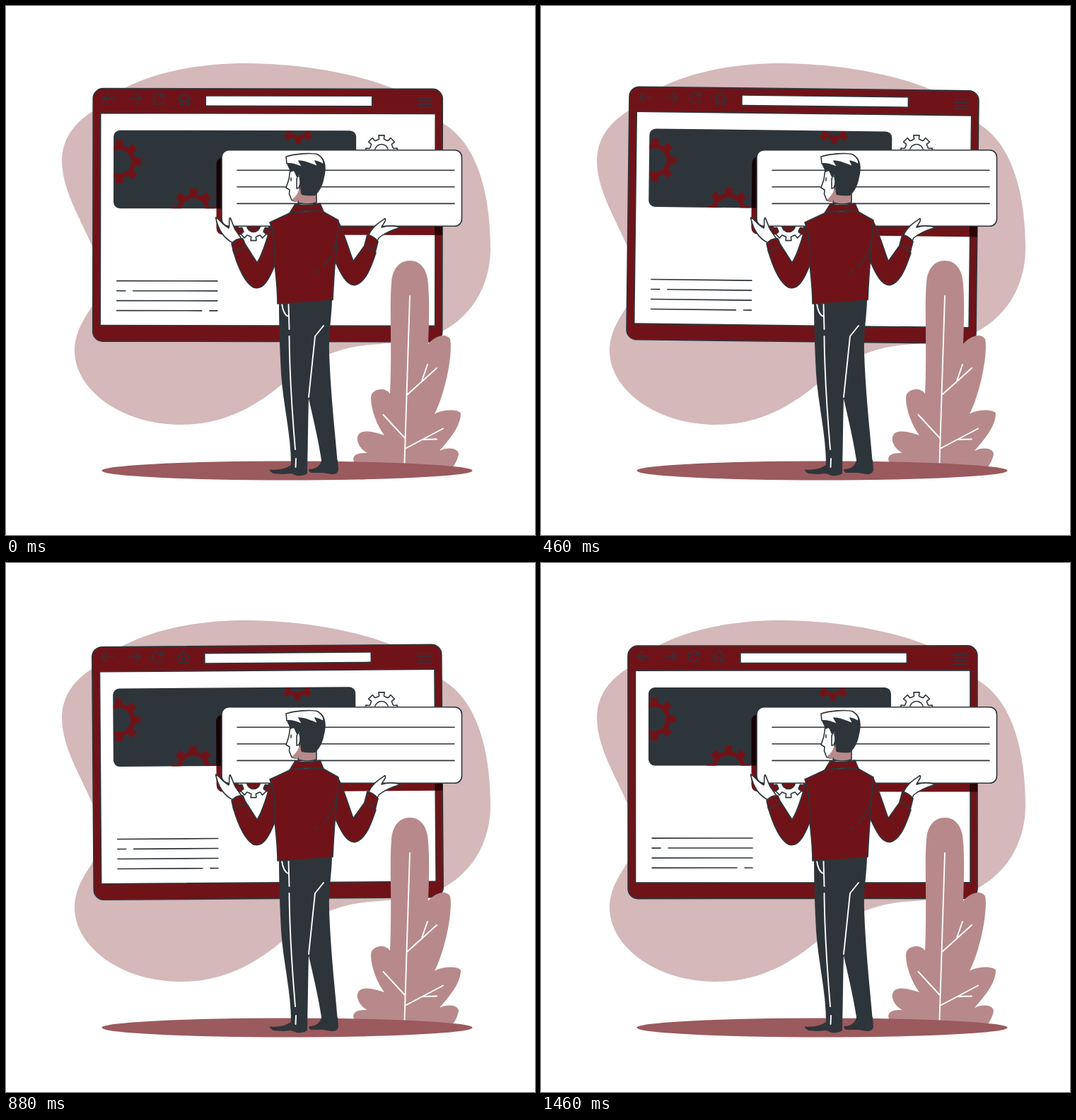
Recreate the animation shown at these times as an HTML page. Size 748 px wide and 748 px high, loop 1.5 s.

```html
<!DOCTYPE html>
<html lang="en">
<head>
<meta charset="utf-8">
<title>Building a web page</title>
<style>
  html, body { margin: 0; width: 100%; height: 100%; overflow: hidden; background: #fff; }
  svg { display: block; width: 100vw; height: 100vh; }
  svg * { stroke-linejoin: round; stroke-linecap: round; }
  .red { fill: #701318; }
  .dark { fill: #2e353a; }
  .white { fill: #fff; }
  .skin { fill: #b7898b; }
  .line { stroke: #2e353a; stroke-width: 1.6; }
  .light { stroke: #fff; stroke-width: 1.9; }
  .open { fill: none; }
  .shade { fill: #701318; mix-blend-mode: multiply; }
</style>
</head>
<body>
<svg viewBox="0 0 748 748">
  <clipPath id="bannerClip"><rect x="152.500" y="176.500" width="342.500" height="110" rx="9"/></clipPath>

  <path fill="#d4b8ba" d="M79 218C80 186 97 165 124 148C160 108 240 81 340 81C430 82 500 98 546 116C575 128 597 146 618 166C667 195 685 266 685 345C684 400 655 440 617 460C590 474 550 476 515 479C470 482 430 500 395 531C355 565 310 592 248 592C160 592 97 540 97 488C97 460 112 440 122 424C132 400 130 360 122 340C105 300 79 260 79 218Z"/>

  <g id="browser">
    <rect class="red line" x="123" y="117" width="494" height="357.500" rx="14"/>
    <rect class="white line" x="133.500" y="152" width="473.500" height="300"/>
    <rect class="white line" x="282" y="127" width="235.500" height="14.500"/>
    <path class="open line" d="M154 131.500H137M144 124.500L137 131.500L144 138.500M175 131.500H191M184 124.500L191 131.500L184 138.500M222 128A7.500 7.500 0 1 0 223 134M223 124V129H218M243 132L252 124L261 132M246 131V140H250V134H254V140H258V131M583 129.500H602M583 134H602M583 138.500H602M583 143H602"/>
    <rect class="dark" x="152" y="176" width="343" height="110.500" rx="9"/>
    <g id="bannerGears" class="red" clip-path="url(#bannerClip)"></g>
    <path class="open line" d="M157 389H299M157 403H169M180 403H299M157 417H299M157 431H277M288 431H299"/>
    <path class="shade" d="M308 214H617V323.500H308Q297.500 323.500 297.500 313V224Q297.500 214 308 214Z"/>
  </g>

  <g id="looseGears" class="white line"></g>

  <rect class="white line" x="305" y="203.700" width="339.500" height="107.600" rx="10"/>
  <path class="open line" d="M327 232.200H634M327 255.800H634M327 279.400H634"/>

  <path class="skin" d="M494 648C487 638 493 631 511 632C497 625 492 608 502 603C512 599 525 604 535 607C522 590 513 560 517 549C522 541 536 539 543 548C546 480 542 425 545 392C546 371 557 360 571 360C585 360 596 371 597 394C599 420 598 450 597 478C605 467 622 461 628 471C632 490 622 545 606 577C618 570 640 570 643 576C643 595 625 615 613 629C625 623 640 625 640 634C638 642 636 646 630 655H500Z"/>
  <path class="open light" d="M571 410L563.500 646M568 549L609 512M588 530L596 507M533.500 578L564 611M566 625L618 597.500M589 613L609 612.500"/>
  <ellipse cx="397.500" cy="657" rx="262" ry="13.500" fill="#9b5a5d"/>

  <g id="man">
    <path class="dark" d="M403 649L426 652V661Q420 665 411 664L403 661L392 662L378 661Q372 657 373 655.500Q392 657 403 649ZM446 643L469 642L470 656Q469 662 461 662L448 660L431 660Q426 656 429 655Q442 655 446 643Z"/>
    <path class="dark" d="M386 419L461 414C461 435 456 462 457 490C459 550 465 600 469 648L447 649C443 620 436 590 428 555C427 590 427 620 426 656L403 654C404 610 392 565 389 520C387 480 386 450 386 419Z"/>
    <path class="open light" d="M390 421Q392 436 399 439M399.500 421L400.500 457M400.500 467C401 520 405 580 409 627M410 640L409.500 652M449 452L437 467L428 553"/>

    <path class="white line" d="M321 335C309 329 300 317 296.500 299C302 301 305 309 315 314C317 308 314 301 317 299.500C321 307 322 315 326 319L333 329Z"/>
    <path class="white line" d="M512 326C517 312 528 306 536 300.500C539 303 532 309 531 313C540 310 551 311 558 313C545 317 535 321 527 328L524 334Z"/>
    <path class="red line" d="M376 307C368 330 364 350 355 363L339 338L321 345C327 366 336 390 350 398C362 402 371 391 382 361Z"/>
    <path class="red line" d="M469 303C478 320 485 345 491 361L509 336L523 349C516 370 508 391 494 394.500C482 396 474 380 465 360Z"/>
    <path class="red line" d="M319 336Q326 328 335 329L340 341Q330 341 322 349ZM511 323Q521 326 526 333L522 349Q517 340 507 338Z"/>
    <path class="red line" d="M403 292L373 306L377 317C380 335 381 350 380 365C382 385 384 400 384 421Q430 420 462 415.500C463 395 464 375 466 355L470 303L447 290Z"/>
    <path class="red line" d="M409 280Q426 284 444 279L449 291Q425 287 401 293Z"/>
    <path class="open line" d="M467 332Q464 352 449 368M437 377L441 374"/>

    <path class="skin line" d="M415 253L413 278Q426 282 439 278V262Z"/>
    <path class="white line" d="M402 231L400 245L396 257L401 260L400.500 266L404 274.500Q409 277 413 275L416 252V236Z"/>
    <path class="skin" d="M404 274Q412 268 415 258L419 268L413 276Q408 277 404 274Z"/>
    <path class="dark" d="M397 222C396 212 405 211 415 210C430 208 444 209 449 217C453 224 452 234 450 242C448 254 443 263 437 268Q426 269 418 267C415 261 418 254 415 239L411 242L407 233L402 235C401 230 398 227 397 222Z"/>
    <path class="white line" d="M396 213C408 209 432 207 441 210C447 214 450 219 449 224C446 222 442 220 437 219Q439 223 441 227C433 225 428 220 414 219Q417 224 419 228C410 224 404 222 397 223Z"/>
    <path class="white line" d="M411 258C416 258 417 249 415 241C413 239 411 242 411 247Z"/>
    <path class="open line" d="M403 243V247"/>
  </g>
</svg>
<script>
  const byId = id => document.getElementById(id);

  // Eight-toothed ring; the even-odd hole lets the page show through.
  function addGear(parent, x, y, radius, hole) {
    const points = [];
    for (let i = 0; i < 8; i++) {
      for (const [offset, scale] of [[-.26, .75], [-.2, .77], [-.18, 1], [.18, 1], [.2, .77], [.26, .75]]) {
        const angle = i * Math.PI / 4 + offset;
        points.push(`${x + radius * scale * Math.cos(angle)} ${y + radius * scale * Math.sin(angle)}`);
      }
    }
    const gear = document.createElementNS("http://www.w3.org/2000/svg", "path");
    gear.setAttribute("fill-rule", "evenodd");
    gear.setAttribute("d", `M${points.join("L")}ZM${x - hole} ${y}a${hole} ${hole} 0 1 0 ${2 * hole} 0a${hole} ${hole} 0 1 0 ${-2 * hole} 0Z`);
    byId(parent).append(gear);
  }

  addGear("bannerGears", 160, 220.5, 31, 17);
  addGear("bannerGears", 265, 289, 31, 17);
  addGear("bannerGears", 413, 170, 25, 13);
  addGear("looseGears", 531, 205, 22.5, 9.5);
  addGear("looseGears", 350, 310, 22, 9.5);

  // The browser rocks one degree each way, at 24 steps per second.
  const STEPS = 36;
  function draw(now) {
    const step = Math.floor((now % 1500 + 5) * STEPS / 1500);
    const phase = (step + .8) / STEPS % 1;
    const angle = phase < .25 ? 4 * phase : phase < .75 ? 2 - 4 * phase : 4 * phase - 4;
    byId("browser").setAttribute("transform", `rotate(${angle} 370 295.5)`);
  }

  const start = performance.now();
  function tick() {
    draw(performance.now() - start);
    requestAnimationFrame(tick);
  }
  tick();
</script>
</body>
</html>
```
